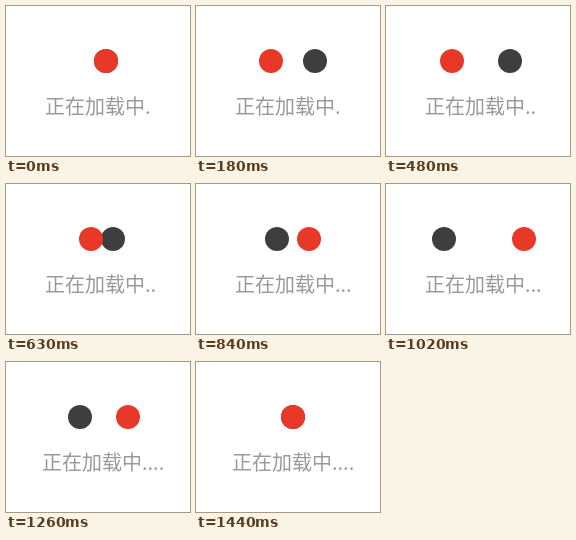
An HTML page that plays this animation: 184 by 150 pixels, repeating every 1.51 s.

```html
<!DOCTYPE html>
<html lang="zh-CN">
<head>
<meta charset="utf-8">
<title>正在加载中</title>
<style>
  html, body { margin: 0; width: 100%; height: 100%; overflow: hidden; background: #fff; }
  svg { display: block; }
  text { font: 20px "Noto Sans CJK SC", "Noto Sans CJK", sans-serif; fill: #999; }
</style>
</head>
<body>
<svg width="184" height="150" viewBox="0 0 184 150">
  <circle id="dark" cy="55" r="12" fill="#3e3e3e"/>
  <circle id="red" cy="55" r="12" fill="#e83828"/>
  <text id="label" y="108"></text>
</svg>
<script>
  const LOOP = 1510, STEP = 30, STEPS_PER_LEG = 12, LAST_STEP = 48;
  const redStops = [100, 50, 97, 146, 97];
  const darkStops = [100, 137, 97, 50, 97];
  const [dark, red, label] = ['dark', 'red', 'label'].map(id => document.getElementById(id));

  function position(stops, step) {
    const leg = Math.min(Math.floor(step / STEPS_PER_LEG), stops.length - 2);
    const part = step / STEPS_PER_LEG - leg;
    return Math.round(stops[leg] + (stops[leg + 1] - stops[leg]) * part);
  }

  function draw(now) {
    const step = Math.min(Math.floor((now % LOOP) / STEP), LAST_STEP);
    const dots = Math.min(1 + Math.floor(step / STEPS_PER_LEG), 4);
    red.setAttribute('cx', position(redStops, step));
    dark.setAttribute('cx', position(darkStops, step));
    label.setAttribute('x', dots === 4 ? 36 : 39);
    label.textContent = '正在加载中' + '.'.repeat(dots);
  }

  const start = performance.now();
  function tick() {
    draw(performance.now() - start);
    requestAnimationFrame(tick);
  }
  tick();
</script>
</body>
</html>
```
